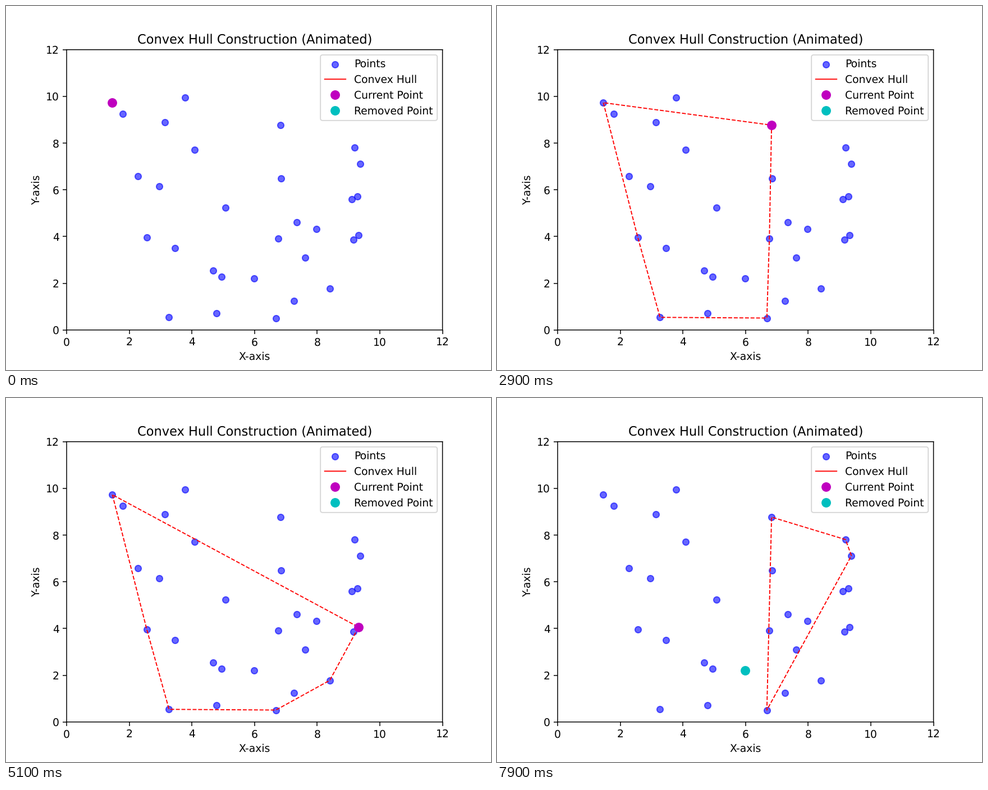
A matplotlib script that plays this animation: 864 px wide and 648 px high, repeating every 8 s.

```python
import matplotlib.pyplot as plt
from matplotlib.animation import FuncAnimation

FRAMES, INTERVAL = 80, 100

# Unhinted text and unsnapped lines keep the smooth sub-pixel geometry.
plt.rcParams.update({"text.hinting": "none", "path.snap": False})

# The input set, sorted by x; every step of the animation is derived from it.
POINTS = [
    (1.46, 9.73), (1.80, 9.25), (2.28, 6.59), (2.56, 3.96), (2.96, 6.16),
    (3.13, 8.88), (3.27, 0.54), (3.46, 3.50), (3.78, 9.95), (4.08, 7.71),
    (4.68, 2.54), (4.79, 0.72), (4.95, 2.27), (5.07, 5.23), (5.99, 2.20),
    (6.68, 0.51), (6.76, 3.91), (6.83, 8.77), (6.84, 6.49), (7.26, 1.25),
    (7.34, 4.61), (7.61, 3.10), (7.98, 4.32), (8.40, 1.78), (9.10, 5.60),
    (9.16, 3.86), (9.19, 7.81), (9.28, 5.71), (9.32, 4.06), (9.38, 7.12),
]


def cross(o, a, b):
    return (a[0] - o[0]) * (b[1] - o[1]) - (a[1] - o[1]) * (b[0] - o[0])


def chain_steps(points):
    """Yield (hull, point, is_removal) for one monotone chain."""
    hull = []
    for p in points:
        while len(hull) >= 2 and cross(hull[-2], hull[-1], p) <= 0:
            yield hull[:], p, True
            hull.pop()
        hull.append(p)
        yield hull[:], p, False


STEPS = [*chain_steps(POINTS), *chain_steps(POINTS[::-1])][:FRAMES]

fig, ax = plt.subplots(figsize=(6.4, 4.8), dpi=135)
ax.set(xlim=(0, 12), ylim=(0, 12), xlabel="X-axis", ylabel="Y-axis",
       title="Convex Hull Construction (Animated)")
ax.scatter(*zip(*POINTS), c="blue", alpha=0.6, label="Points")
hull_line, = ax.plot([], [], "r-", lw=1, label="Convex Hull")
current_dot, = ax.plot([], [], "mo", markersize=8, label="Current Point")
removed_dot, = ax.plot([], [], "co", markersize=8, label="Removed Point")
ax.legend(loc="upper right")
hull_line.set_linestyle("--")  # the legend key stays solid


def update(i):
    hull, (x, y), removal = STEPS[i]
    hull_line.set_data(*zip(*hull, hull[0]))
    for dot, shown in ((current_dot, not removal), (removed_dot, removal)):
        dot.set_data([x], [y])
        dot.set_visible(shown)
    return hull_line, current_dot, removed_dot


anim = FuncAnimation(fig, update, frames=FRAMES, interval=INTERVAL,
                     repeat=True, repeat_delay=0)
plt.show()
```
